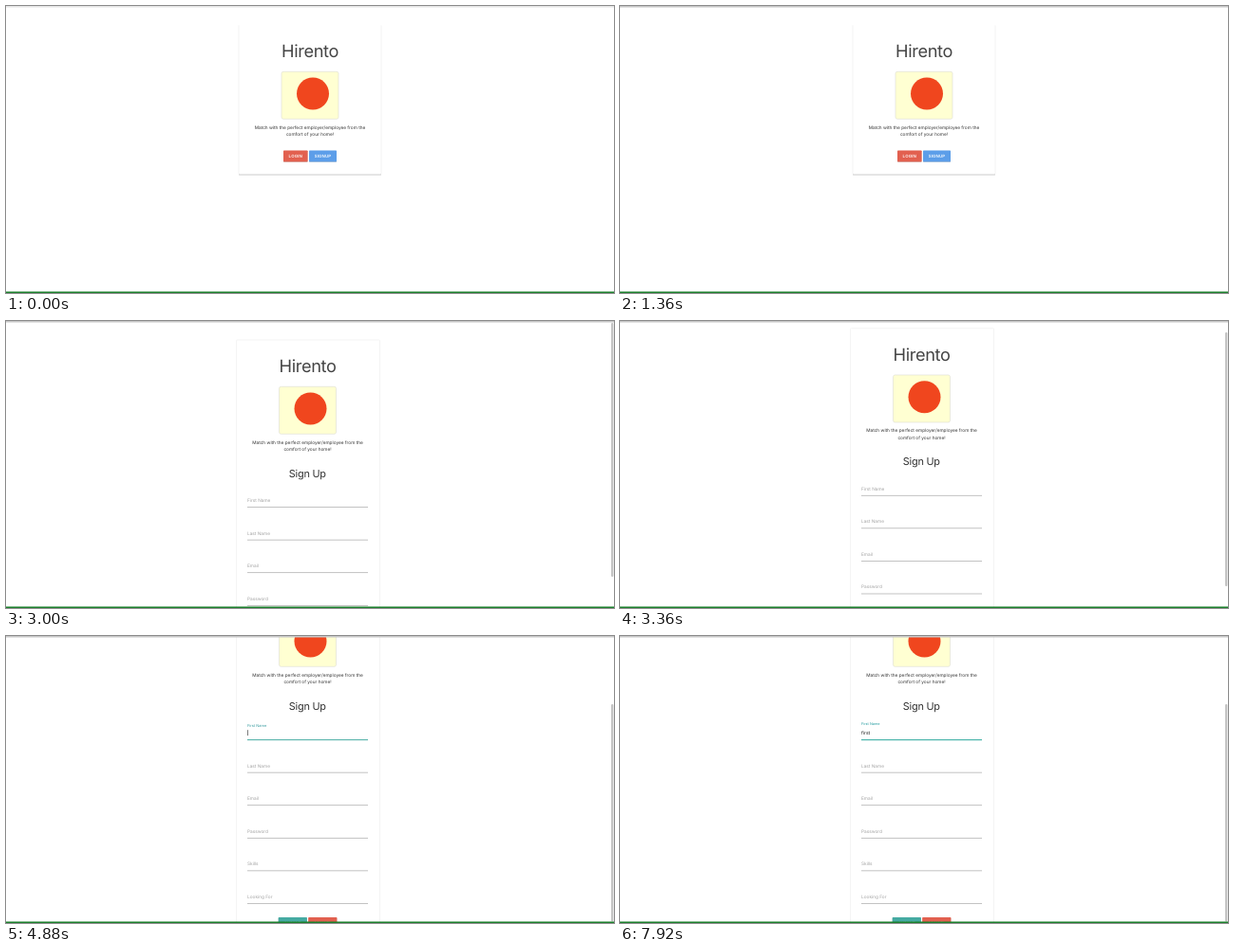
An HTML page for the animation above (8000 ms loop, 640 by 303 pixels).

```html
<!DOCTYPE html>
<html lang="en">
<head>
<meta charset="utf-8">
<title>Sign up</title>
<style>
  html, body { margin: 0; width: 100%; height: 100%; overflow: hidden; background: #fff; }
  svg { display: block; width: 100vw; height: 100vh; }
  text { font-family: Inter, Roboto, sans-serif; text-rendering: geometricPrecision; fill: #333; }
  .mid { text-anchor: middle; }
  .title { font-size: 18.2px; letter-spacing: -.02em; fill: #444; }
  .head { font-size: 10.9px; letter-spacing: -.02em; }
  .body { font-size: 4.75px; }
  .btn { font-size: 4.4px; font-weight: 600; letter-spacing: .16px; fill: #fff; }
  .label { font-size: 4.75px; fill: #a3a3a3; }
  .value { font-size: 5px; fill: #222; }
</style>
</head>
<body>
<svg id="stage" viewBox="0 0 640 303" preserveAspectRatio="none">
  <g id="login"></g>
  <g id="signup"></g>
  <rect id="thumb" x="637" width="2.4" rx="1" fill="#c4c4c4"/>
  <rect id="top" width="640" height="1.5"/>
  <rect y="301.5" width="640" height="1.5" fill="#1a7f2b"/>
</svg>
<script>
const LOOP = 8000;
const PAGE_AT = 3000;
const FOCUS_AT = 4760, FOCUS_MS = 200;
const FIELDS = ["First Name", "Last Name", "Email", "Password", "Skills", "Looking For"];
const GAP = 34.58;

// [start, scroll offset, thumb top, thumb bottom]
const SCROLL = [[3000, 0, 2, 270], [3360, 12.3, 12, 280], [3440, 87, 72, 301.5]];
const TYPED = [[0, ""], [6120, "f"], [6440, "fi"], [6520, "fir"], [6680, "firs"], [6840, "first"]];
const CARET = [[0, 0], [4760, 1], [5280, 0], [5720, 1], [7320, 0]];

const $ = id => document.getElementById(id);
const login = $("login"), signup = $("signup");

function add(parent, tag, attrs, content = "") {
  const el = document.createElementNS("http://www.w3.org/2000/svg", tag);
  for (const key in attrs) el.setAttribute(key, attrs[key]);
  el.textContent = content;
  return parent.appendChild(el);
}

function button(parent, x, y, width, fill, label) {
  add(parent, "rect", { x, y: y + .6, width, height: 12, rx: .7, fill: "#000", opacity: .18 });
  add(parent, "rect", { x, y, width, height: 12, rx: .7, fill });
  add(parent, "text", { x: x + width / 2, y: y + 7.7, class: "btn mid" }, label);
}

function intro(parent, cx) {
  add(parent, "text", { x: cx, y: 54.2, class: "title mid" }, "Hirento");
  add(parent, "rect", { x: cx - 30, y: 69.3, width: 60, height: 50, rx: 2,
    fill: "#ffffd2", stroke: "#dcdcd4", "stroke-width": .6 });
  add(parent, "circle", { cx: cx + 3, cy: 92.5, r: 17, fill: "#f0461e" });
  add(parent, "text", { x: cx, y: 129.8, class: "body mid" },
    "Match with the perfect employer/employee from the");
  add(parent, "text", { x: cx, y: 137.2, class: "body mid" }, "comfort of your home!");
}

// Landing card
add(login, "rect", { x: 245, y: 20, width: 150, height: 158.6, rx: .7, fill: "#c2c2c2" });
add(login, "rect", { x: 244.7, y: 20, width: 150.6, height: 157.4, rx: .7, fill: "#ececec" });
add(login, "rect", { x: 245.3, y: 19.6, width: 149.4, height: 158, rx: .7, fill: "#fff" });
intro(login, 320);
button(login, 292, 152.5, 25.6, "#e2604f", "LOGIN");
button(login, 319, 152.5, 29, "#5c9ee9", "SIGNUP");

// Form card
add(signup, "rect", { x: 242.5, y: 20, width: 151, height: 400, rx: .7,
  fill: "#fff", stroke: "#efefef", "stroke-width": .7 });
intro(signup, 317.5);
add(signup, "text", { x: 317.3, y: 164.8, class: "head mid" }, "Sign Up");
const rows = FIELDS.map((name, i) => {
  const y = 191 + i * GAP;
  return {
    line: add(signup, "rect", { x: 254, y: y + 5.2, width: 127, height: .7, fill: "#a8a8a8" }),
    label: add(signup, "text", { class: "label" }, name)
  };
});
rows.forEach((row, i) => row.label.setAttribute("transform", `translate(254 ${191 + i * GAP})`));
const value = add(signup, "text", { x: 254, y: 191, class: "value" });
const caret = add(signup, "rect", { y: 186.2, width: .6, height: 6, fill: "#222" });
button(signup, 286.7, 384, 30.2, "#45aaa2", "SUBMIT");
button(signup, 318.2, 384, 30.2, "#e2604f", "CANCEL");

const at = (steps, t) => steps.reduce((hit, step) => step[0] <= t ? step : hit);
const clamp = v => Math.max(0, Math.min(1, v));
const mix = (a, b, p) => a + (b - a) * p;
const blend = (a, b, p) => `rgb(${a.map((v, i) => Math.round(mix(v, b[i], p)))})`;

function draw(t) {
  const open = t >= PAGE_AT;
  login.setAttribute("display", open ? "none" : "inline");
  signup.setAttribute("display", open ? "inline" : "none");
  $("thumb").setAttribute("display", open ? "inline" : "none");
  $("top").setAttribute("fill", blend([230, 230, 230], [200, 200, 200], clamp((t - 40) / 760)));
  if (!open) return;

  const [, offset, from, to] = at(SCROLL, t);
  signup.setAttribute("transform", `translate(0 ${-offset})`);
  $("thumb").setAttribute("y", from);
  $("thumb").setAttribute("height", to - from);

  const focus = 1 - (1 - clamp((t - FOCUS_AT) / FOCUS_MS)) ** 2;
  const { label, line } = rows[0];
  label.setAttribute("transform",
    `translate(254 ${mix(191, 181.4, focus)}) scale(${mix(1, .8, focus)})`);
  label.style.fill = blend([163, 163, 163], [38, 156, 160], focus);
  line.setAttribute("fill", blend([168, 168, 168], [38, 166, 154], focus));
  line.setAttribute("height", mix(.7, 1, focus));

  value.textContent = at(TYPED, t)[1];
  caret.setAttribute("x", 254.1 + value.getComputedTextLength());
  caret.setAttribute("opacity", at(CARET, t)[1]);
}

const start = performance.now();
function tick() {
  draw((performance.now() - start) % LOOP);
  requestAnimationFrame(tick);
}
tick();
</script>
</body>
</html>
```
